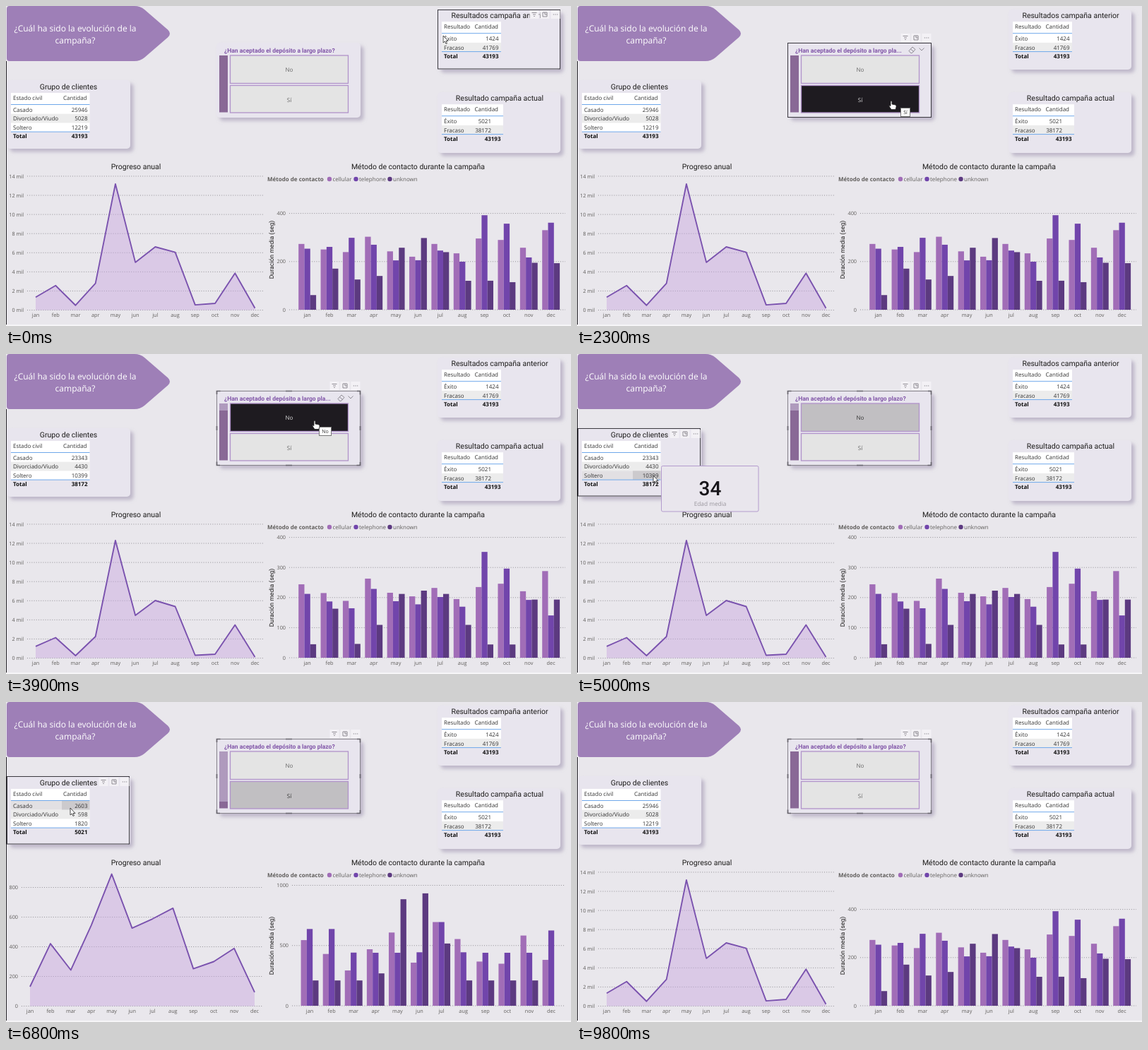
An HTML page for the animation above (9.9 s loop, 800 px wide and 453 px high).

```html
<!DOCTYPE html>
<html lang="es">
<head>
<meta charset="utf-8">
<title>Evolución de la campaña</title>
<style>
html, body { margin: 0; width: 100%; height: 100%; overflow: hidden; background: #e9e7ec; }
svg { display: block; width: 800px; height: 453px; font: 8px "Open Sans", "Noto Sans", sans-serif; text-rendering: geometricPrecision; }
.title { font: 400 10.5px Roboto, sans-serif; fill: #1d1c1b; }
.axis { font-size: 7.3px; fill: #605e5c; }
.bold { font-weight: 700; }
.grid { stroke: #929096; stroke-dasharray: 1 2.2; }
.icon { fill: none; stroke: #66646b; stroke-width: .7; }
.frame { fill: none; stroke: #3a383f; }
</style>
</head>
<body>
<svg viewBox="0 0 800 453">
  <defs>
    <filter id="shadow" x="-10%" y="-15%" width="125%" height="140%">
      <feDropShadow dx="4.5" dy="4.5" stdDeviation="2.5" flood-color="#9488a8" flood-opacity=".5"/>
    </filter>
  </defs>
  <g id="base"></g>
  <g id="live"></g>
</svg>
<script>
const LOOP = 9900, FADE = 350;
const MONTHS = 'jan feb mar apr may jun jul aug sep oct nov dec'.split(' ');
const COLORS = ['#a16db7', '#7145ab', '#5c3a80'];

const ease = k => k * k * (3 - 2 * k);
const mix = (a, b, k) => a + (b - a) * k;
const bump = (i, center, width, height) => height * Math.exp(-(((i - center) / width) ** 4));
const months = rule => MONTHS.map((m, i) => rule(i));

// Clients per month and mean call length in seconds, by answer.
const no = {
  groups: [23343, 4430, 10399],
  clients: [1219, 2142, 258, 2253, 12297, 4468, 6019, 5391, 295, 406, 3471, 111],
  cellular: [244, 215, 189, 263, 216, 204, 232, 195, 235, 246, 221, 288]
};
no.telephone = months(i => no.cellular[i] * .87 + bump(i, 8.4, .65, 170) - bump(i, 11, .6, 110));
no.unknown = months(i => 43 + bump(i, 1, .7, 120) + bump(i, 5, 2, 180) + bump(i, 10.5, 1, 160));

const si = {
  groups: [2603, 598, 1820],
  clients: [131, 421, 243, 545, 890, 526, 588, 660, 252, 300, 389, 93],
  cellular: [545, 430, 293, 469, 608, 358, 695, 554, 367, 349, 583, 381]
};
si.telephone = months(i => 440 + bump(i, .5, 1, 210) + bump(i, 6, .7, 255) + bump(i, 11, .6, 185));
si.unknown = months(i => i < 11 ? 210 + bump(i, 4.7, 1.35, 725) : 0);

// Everyone: counts add up, durations are averaged by number of clients.
const add = key => no[key].map((n, i) => n + si[key][i]);
const average = key => months(i => si[key][i]
  ? mix(no[key][i], si[key][i], si.clients[i] / (si.clients[i] + no.clients[i])) : no[key][i]);
const all = {
  groups: add('groups'), clients: add('clients'),
  cellular: average('cellular'), telephone: average('telephone'), unknown: average('unknown')
};

const ticks = (step, max, unit, name = v => v) =>
  Array.from({ length: max / step + 1 }, (_, i) => [name(i * step), i * step * unit]);

// Turns data into pixel heights and axes.
function makeView(data, wide, lineUnit, barUnit, barStep, barMax) {
  return {
    rows: data.groups,
    line: data.clients.map(v => v * lineUnit),
    bars: [data.cellular, data.telephone, data.unknown].map(list => list.map(v => v * barUnit)),
    lineTicks: wide ? ticks(2000, 14000, lineUnit, v => v / 1000 + ' mil') : ticks(200, 800, lineUnit),
    barTicks: ticks(barStep, barMax, barUnit),
    lineLeft: wide ? 25 : 17, barLeft: wide ? 396 : 400,
    lineX: wide ? [42, 352.5] : [34, 352], barX: wide ? [426.6, 771.6] : [430, 772]
  };
}
const VIEWS = {
  all: makeView(all, true, .01354, .341, 200, 400),
  no: makeView(no, true, .01354, .426, 100, 400),
  si: makeView(si, false, .21, .1705, 500, 1000)
};
const CLICKS = [[0, 'all'], [3100, 'no'], [6150, 'si'], [7850, 'all']];

// Pointer stops: x, y, arrival, departure.
const STOPS = [
  [619, 42, 0, 500], [445, 134, 1900, 2700], [437, 94, 3000, 4100], [108, 172, 4700, 5400],
  [369, 139, 5800, 6200], [91, 150, 6700, 7200], [458, 125, 7700, 8600], [560, -20, 9100, LOOP]
];

const rect = (x, y, w, h, fill, more = '') => `<rect x="${x}" y="${y}" width="${w}" height="${h}" fill="${fill}" ${more}/>`;
const frame = (x, y, w, h) => `<rect x="${x}" y="${y}" width="${w}" height="${h}" class="frame"/>`;
const text = (x, y, s, anchor = 'start', more = 'fill="#333"') => `<text x="${x}" y="${y}" text-anchor="${anchor}" ${more}>${s}</text>`;
const title = (x, y, s) => text(x, y, s, 'middle', 'class="title"');
const rule = (x1, x2, y, more) => `<path d="M${x1} ${y}H${x2}" ${more}/>`;
const card = (x, y, w, h) => rect(x, y, w, h, '#e8e5ee', 'rx="5" filter="url(#shadow)"');
const inside = (p, x, y, w, h) => p.x >= x && p.x < x + w && p.y >= y && p.y < y + h;
const during = (t, a, b) => t >= a && t < b;

// Rights: right edges of the heading, the values and the total.
function table(x, y, w, heads, names, values, rights, lit = -1) {
  const step = 12.7, top = y + 17, end = top + names.length * step;
  const blue = 'stroke="#6fa8ea"', total = values.reduce((a, b) => a + b);
  let s = rect(x, y, w, end - y, '#fff');
  s += text(x + 3, y + 9.5, heads[0]) + text(x + rights[0], y + 9.5, heads[1], 'end');
  names.forEach((name, i) => {
    const ry = top + i * step;
    if (i === lit) s += rect(x, ry, w, step, '#e2e0e3') + rect(x + 72, ry, w - 72, step, '#cccacd');
    else if (i % 2) s += rect(x, ry, w, step, '#ececec');
    s += text(x + 3, ry + 9.6, name) + text(x + rights[1], ry + 9.6, values[i], 'end');
  });
  const bold = 'class="bold" fill="#111"';
  s += text(x + 3, end + 9.2, 'Total', 'start', bold) + text(x + rights[2], end + 9.2, total, 'end', bold);
  return s + rule(x, x + w, y + 16.5, blue) + rule(x, x + w, end, blue);
}

// Filter, focus and menu buttons.
function tools(x, y) {
  let s = '';
  for (let i = 0; i < 3; i++) s += rect(x - 6.5 + i * 15, y - 6, 13, 12, '#f3f1f5');
  return s + `<path class="icon" d="M${x - 3.5} ${y - 2.5}h7m-5.5 2.5h4m-2.8 2.5h1.6"/>
    <path class="icon" d="M${x + 15} ${y - 3}h-3v6h6v-3m-3-3h3v3h-3z"/>
    <path class="icon" stroke-dasharray="1.4 1.2" d="M${x + 26.7} ${y}h7"/>`;
}

function slicer(t, p, view) {
  const hover = inside(p, 298, 52, 204, 106), active = t >= CLICKS[1][0];
  const split = { all: 70, no: 80, si: 141 }[view];
  let s = card(298, 52, 204, 106);
  if (hover || active) s += tools(465, 45);
  s += text(309, 65.6, '¿Han aceptado el depósito a largo ' + (hover ? 'pla...' : 'plazo?'), 'start',
    'style="font:700 8.5px Roboto,sans-serif" fill="#8156a8"');
  if (hover) s += '<path class="icon" d="M470 63.5l5-5.5 4 3.5-4.5 5h-2zM472.5 61l4 3.5M484.5 59.5l3.5 3.5 3.5-3.5"/>';
  s += rect(302, 70, 12, 80, '#af9abd') + rect(302, split, 12, 150.5 - split, '#896996');
  [['No', 'no', 70, 39.5], ['Sí', 'si', 112.5, 38.5]].forEach(([name, id, y, h]) => {
    const over = inside(p, 317, y, 168, h);
    s += rect(317.5, y, 167, h, over ? '#1e1b20' : view === id ? '#c1bfc2' : '#e4e4e4', 'stroke="#b193ca" stroke-width="1.3"');
    s += text(401, y + 23, name, 'middle', `fill="${over ? '#ddd' : view === id ? '#333' : '#666'}"`);
  });
  if (active) {
    s += rect(298.5, 52.5, 203, 105, 'none', 'stroke="#85828a"');
    s += '<path d="M298.5 57v-4.500h5M497 52.5h4.500v5M501.5 153v4.500h-5M303 157.5h-4.500v-5M396 52.5h9M396 157.5h9M298.5 102v6M501.5 102v6" fill="none" stroke="#66636b" stroke-width="1.7"/>';
  } else if (hover) s += frame(298.5, 52.5, 203, 105);
  return s;
}

function groups(p, view) {
  const lit = inside(p, 79, 140, 40, 38) ? Math.floor((p.y - 140) / 12.7) : -1;
  let s = card(1, 105, 175, 97) + title(88.5, 118, 'Grupo de clientes');
  s += table(7, 123, 111.5, ['Estado civil', 'Cantidad'], ['Casado', 'Divorciado/Viudo', 'Soltero'], VIEWS[view].rows, [107.5, 108.5, 108.5], lit);
  if (inside(p, 1, 105, 175, 97)) s += frame(1.5, 105.5, 173, 95.5) + tools(138, 113);
  return s;
}

function axis(list, left, right, base) {
  return list.map(([label, h]) => rule(left + 5, right, base - h, 'class="grid"') +
    text(left, base + 2.6 - h, label, 'end', 'class="axis"')).join('');
}

function charts(from, to, k) {
  const a = VIEWS[from], b = VIEWS[to], points = [];
  const place = (key, i) => mix(mix(a[key][0], b[key][0], k), mix(a[key][1], b[key][1], k), i / 11);
  let s = axis(b.lineTicks, b.lineLeft, 364, 430.5) + axis(b.barTicks, b.barLeft, 792, 430);
  MONTHS.forEach((m, i) => {
    const x = place('lineX', i), c = place('barX', i);
    points.push(x.toFixed(2) + ' ' + (430.5 - mix(a.line[i], b.line[i], k)).toFixed(2));
    s += text(x, 440, m, 'middle', 'class="axis"') + text(c, 440, m, 'middle', 'class="axis"');
    COLORS.forEach((color, n) => {
      const h = mix(a.bars[n][i], b.bars[n][i], k);
      s += rect(c - 12.4 + n * 8.3, 430 - h, 8.3, h, color);
    });
  });
  const d = 'M' + points.join('L');
  s += `<path d="${d}V430.5H${place('lineX', 0)}Z" fill="#c7a6df" fill-opacity=".46"/>`;
  return s + `<path d="${d}" fill="none" stroke="#7a52ae" stroke-width="1.9" stroke-linejoin="round"/>`;
}

const hint = (x, y, w, s) => rect(x + .5, y + .5, w, 12, '#fff', 'stroke="#777"') +
  text(x + .5 + w / 2, y + 9, s, 'middle', 'font-size="7" fill="#333"');

const ageCard = () => rect(119.5, 158.5, 137.5, 64.5, '#e9e6ed', 'rx="2" stroke="#b39bcd"') +
  text(188.5, 199.5, '34', 'middle', 'style="font:500 28px Roboto,sans-serif" fill="#17151a"') +
  text(188.5, 215, 'Edad media', 'middle', 'font-size="8.3" fill="#99969d"');

function pointer(p) {
  const hand = inside(p, 317, 70, 168, 40) || inside(p, 317, 112, 168, 39);
  const d = hand
    ? 'M-1 1Q0-.5 1 1V5L6 6Q7.500 6.500 7 9L6 12.500H0L-3 8Q-3.500 6-1 7.500Z'
    : 'M0 0V10L2.300 8 4 11.500 5.500 10.800 4 7.500H7Z';
  return `<path transform="translate(${p.x.toFixed(2)} ${p.y.toFixed(2)})" d="${d}" fill="#fff" stroke="#222" stroke-width=".8" stroke-linejoin="round"/>`;
}

function cursorAt(t) {
  const i = STOPS.findIndex(stop => t < stop[3]);
  const [x, y, arrive] = STOPS[i];
  if (t >= arrive) return { x, y };
  const [px, py, , leave] = STOPS[i - 1], k = ease((t - leave) / (arrive - leave));
  return { x: mix(px, x, k), y: mix(py, y, k) };
}

function drawBase() {
  const heads = ['Resultado', 'Cantidad'], names = ['Éxito', 'Fracaso'];
  let s = rect(0, 0, 800, 453, '#e9e7ec') + rect(0, 78, 1, 375, '#242227') + rect(0, 451, 800, 2, '#f6f5f7');
  s += '<path d="M1 4Q1 0 5 0H182Q190 0 196 5L229 33.5Q235 39 229 44.5L196 73Q190 78 182 78H5Q1 78 1 74Z" fill="#9e7fb7"/>';
  s += text(98, 36, '¿Cuál ha sido la evolución de la', 'middle', 'font-size="12" fill="#fff"');
  s += text(98, 53, 'campaña?', 'middle', 'font-size="12" fill="#fff"');
  s += card(611, 5, 174, 85) + title(699, 17.3, 'Resultados campaña anterior');
  s += table(617, 22.2, 84, heads, names, [1424, 41769], [80, 80.5, 80.5]);
  s += card(611, 122, 174, 86) + title(699, 134.3, 'Resultado campaña actual');
  s += table(617, 139.2, 87, heads, names, [5021, 38172], [80, 70, 83.5]);
  s += title(184, 230.8, 'Progreso anual') + title(583.5, 230.8, 'Método de contacto durante la campaña');
  s += text(370, 248, 'Método de contacto', 'start', 'class="bold" fill="#605e5c"');
  [['cellular', 458], ['telephone', 495.5], ['unknown', 543.5]].forEach(([name, x], i) => {
    s += `<circle cx="${x}" cy="245" r="3.2" fill="${COLORS[i]}"/>` + text(x + 4.5, 248, name, 'start', 'fill="#605e5c"');
  });
  s += text(0, 0, 'Duración media (seg)', 'middle', 'transform="translate(378.5 345) rotate(-90)" style="font:400 8.7px Roboto,sans-serif" fill="#1d1c1b"');
  document.getElementById('base').innerHTML = s;
}

const live = document.getElementById('live');
let shown = '';
function draw(t) {
  const p = cursorAt(t), step = CLICKS.filter(c => c[0] <= t).length - 1;
  const [start, view] = CLICKS[step], before = step ? CLICKS[step - 1][1] : view;
  const k = ease(Math.min(1, (t - start) / FADE));
  let s = charts(before, view, k) + groups(p, view) + slicer(t, p, view);
  if (inside(p, 611, 5, 174, 85)) s += frame(611.5, 5.5, 173, 83.5) + tools(748, 12);
  if (during(t, 2200, 2700)) s += hint(458, 144, 13, 'Sí');
  if (during(t, 3500, 4100)) s += hint(443, 103, 17, 'No');
  if (during(t, 5000, 6000)) s += ageCard();
  s += pointer(p);
  if (s !== shown) live.innerHTML = shown = s;
}

drawBase();
const began = performance.now();
function tick() {
  draw((performance.now() - began) % LOOP);
  requestAnimationFrame(tick);
}
tick();
</script>
</body>
</html>
```
